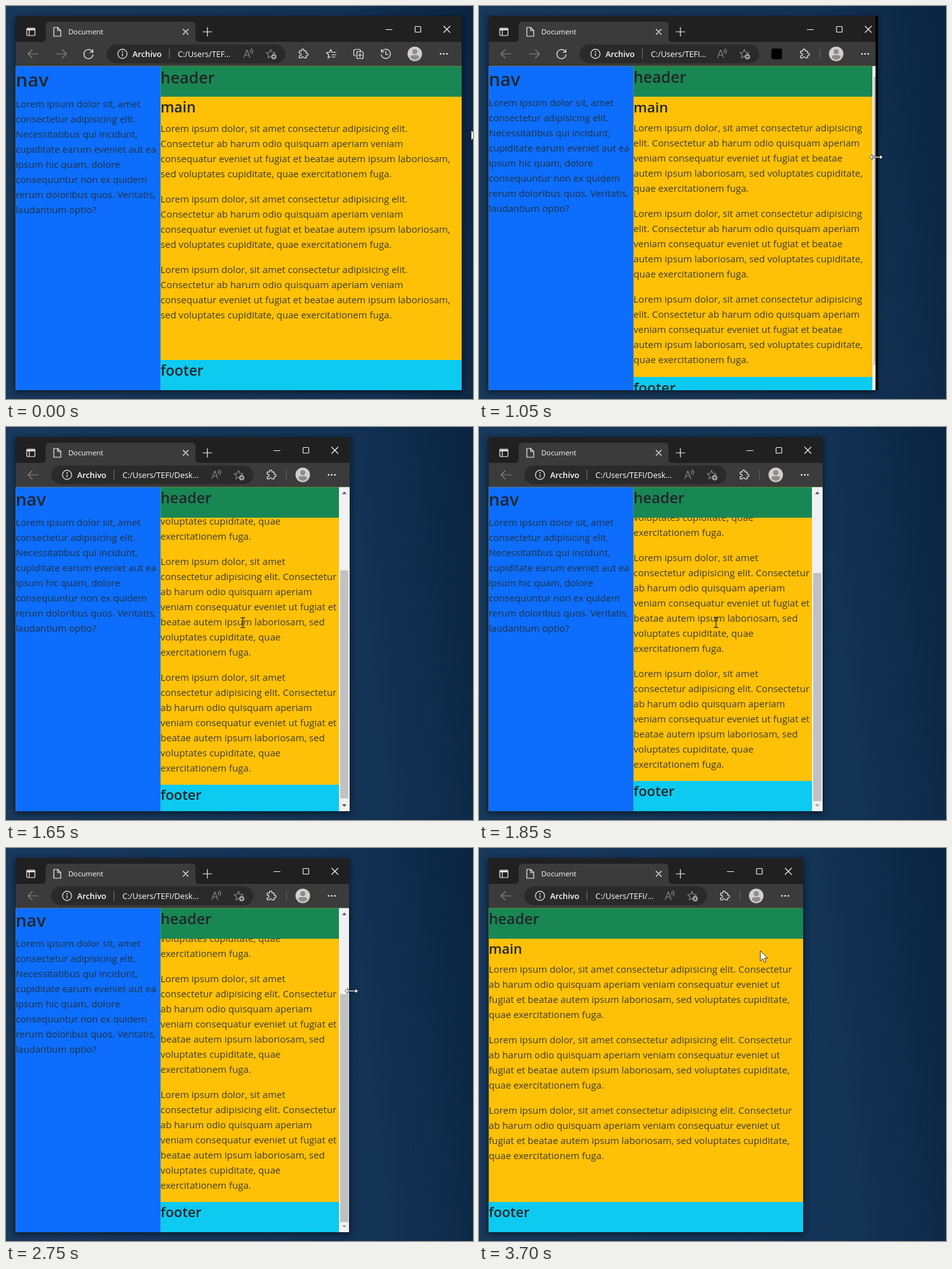
Recreate the animation shown at these times as an HTML page. Size 742 px wide and 624 px high, loop 3750 ms.

```html
<!DOCTYPE html>
<html lang="es">
<head>
<meta charset="utf-8">
<title>Responsive layout</title>
<style>
html, body { margin: 0; width: 742px; height: 624px; overflow: hidden; background: #0d2a49; }
svg { display: block; font-family: "Open Sans", "Noto Sans", sans-serif; }
text { white-space: pre; }
.p { font-size: 15.1px; fill: #212529; fill-opacity: .86; }
.h { font-weight: 600; fill: #212529; }
.ico { fill: none; stroke: #f2f2f2; stroke-width: 1.2; stroke-linecap: round; stroke-linejoin: round; }
.dim { stroke: #8a8a8a; }
.ui { fill: #fff; }
</style>
</head>
<body>
<svg width="742" height="624" viewBox="0 0 742 624">
  <defs>
    <linearGradient id="desk" x1="0" y1=".1" x2="1" y2="0">
      <stop offset="0" stop-color="#18395c"/>
      <stop offset=".72" stop-color="#133355"/>
      <stop offset="1" stop-color="#0a2441"/>
    </linearGradient>
    <filter id="blur" x="-10%" y="-10%" width="120%" height="120%"><feGaussianBlur stdDeviation="5"/></filter>
    <clipPath id="win"><rect id="winBox" x="15" y="16" height="594"/></clipPath>
    <clipPath id="body"><rect x="15" y="144" width="727" height="466"/></clipPath>
  </defs>
  <rect width="742" height="624" fill="url(#desk)"/>
  <rect id="shade" x="13" y="17" height="597" fill="#000" opacity=".45" filter="url(#blur)"/>
  <rect id="lag" y="16" width="4" height="594"/>
  <g clip-path="url(#win)"><g id="chrome"></g><g id="page"></g></g>
  <g id="cursor"></g>
</svg>
<script>
const LOOP = 3750, STEP = 50;
const TOP = 95.5, LEFT = 15.5, COL = 245.5, MAIN = 144, FOOT = 562;
const LOREM = 'Lorem ipsum dolor, sit amet consectetur adipisicing elit. Consectetur ab harum odio quisquam ' +
  'aperiam veniam consequatur eveniet ut fugiat et beatae autem ipsum laboriosam, sed voluptates ' +
  'cupiditate, quae exercitationem fuga.';
const NAV = 'Lorem ipsum dolor sit, amet|consectetur adipisicing elit.|Necessitatibus qui incidunt,|' +
  'cupiditate earum eveniet aut ea|ipsum hic quam, dolore|consequuntur non ex quidem|' +
  'rerum doloribus quos. Veritatis,|laudantium optio?';
const PATH = 'C:/Users/TEFI/Desktop';

// [time, value...] keys
const EDGE = [[680, 724], [800, 713], [1050, 630], [1100, 603], [1200, 555], [1250, 546],
  [2700, 546], [2750, 545], [3150, 515]];
const LAYOUT = [[850, 724], [1050, 642], [1100, 615], [1200, 560], [1250, 546], [2750, 546], [3200, 515]];
const SCROLL = [[1400, 0], [1500, 70], [1600, 145], [1650, 164], [1700, 171], [1950, 171], [2050, 115],
  [2100, 69], [2200, 0], [2250, 0], [2350, 100], [2450, 171]];
const MOUSE = [[0, 739, 197], [200, 734, 205], [400, 727, 214], [680, 727, 217], [800, 716, 219],
  [1050, 631, 240], [1100, 604, 243], [1200, 557, 246], [1250, 549, 247], [1400, 376, 311],
  [2100, 377, 310], [2450, 378, 310], [2550, 571, 240], [2650, 553, 228], [2750, 549, 227],
  [3150, 517, 224], [3250, 516, 222], [3500, 459, 177], [3600, 447, 163]];

const $ = id => document.getElementById(id);
const pen = document.createElement('canvas').getContext('2d');
pen.font = '15.1px "Open Sans", "Noto Sans", sans-serif';

function at(keys, t, i = 1) {
  const n = keys.findIndex(k => k[0] > t);
  if (n === 0) return keys[0][i];
  if (n < 0) return keys[keys.length - 1][i];
  const a = keys[n - 1], b = keys[n];
  return a[i] + (b[i] - a[i]) * (t - a[0]) / (b[0] - a[0]);
}

function wrap(str, width) {
  const lines = [];
  let line = '';
  for (const word of str.split(' ')) {
    const next = line ? line + ' ' + word : word;
    if (line && pen.measureText(next).width > width) { lines.push(line); line = word; }
    else line = next;
  }
  return lines.concat(line);
}

const rect = (x, y, w, h, fill, r = 0) =>
  `<rect x="${x}" y="${y}" width="${Math.max(0, w)}" height="${h}" rx="${r}" fill="${fill}"/>`;
const label = (x, y, s, cls, extra = '') => `<text x="${x}" y="${y}" class="${cls}" ${extra}>${s}</text>`;
const head = (x, y, size, s) => label(x, y + size, s, 'h', `font-size="${size * .912}"`);
const para = (x, y, lines) => lines.map((s, i) => label(x, y + 18.4 + i * 24, s, 'p')).join('');
const icon = (x, y, d, cls = '') => `<path class="ico ${cls}" transform="translate(${x} ${y})" d="${d}"/>`;
const ring = r => `M${-r} 0a${r} ${r} 0 1 1 ${2 * r} 0a${r} ${r} 0 1 1 ${-2 * r} 0`;

const STAR = 'M0-7l2 4.5 5 .6-3.7 3.4 1 5L0 4-4.3 6.5l1-5L-7-1.9l5-.6z';
const PUZZLE = 'M-6-4.5h3.5a2.2 2.2 0 1 1 4 0H5v3.5a2.2 2.2 0 1 1 0 4v3.5H1.5a2 2 0 1 0-4 0H-6V3a2.2 2.2 0 1 0 0-4z';
const ARROW = 'M8 0H-8M-1.5-6.5L-8 0l6.5 6.5';

function drawChrome(right) {
  const wide = right > 700, mid = right > 600;
  const pl = mid ? 160 : 72;
  const pr = right - (wide ? 280 : mid ? 197 : 153);
  const chars = Math.max(3, Math.min(18, Math.floor(12.85 + .2 * (pr - pl - 113 - 171))));
  let s = rect(LEFT, 16, 727, 41, '#202020') + rect(LEFT, 57, 727, 39, '#3b3b3b') +
    `<path fill="#3b3b3b" d="M57 57q6 0 6-6V31q0-6 6-6h226q6 0 6 6v20q0 6 6 6z"/>`;
  s += icon(39.5, 41, 'M-4.5-6h9q2 0 2 2v8q0 2-2 2h-9q-2 0-2-2v-8q0-2 2-2zM-2.5-3v9') +
    '<path fill="#f2f2f2" d="M33.5 36h12v2.5h-12z"/>' +
    icon(81.5, 41, 'M-5.5-7h6l5 5v9h-11zM.5-7v5h5') +
    label(99, 45.3, 'Document', 'ui', 'font-size="11.4" font-weight="500"') +
    icon(285.5, 41, 'M-4-4l8 8M4-4l-8 8') + icon(320, 41, 'M-7 0H7M0-7V7');
  s += icon(right - 115.5, 37.5, 'M-5 0H5') +
    icon(right - 69.5, 37, 'M-3.5-4.5h7q1 0 1 1v7q0 1-1 1h-7q-1 0-1-1v-7q0-1 1-1z') +
    icon(right - 23.5, 37, 'M-5-5L5 5M5-5L-5 5');

  s += icon(43, 76, ARROW, 'dim');
  if (mid) s += icon(88, 76, 'M-8 0H8M1.5-6.5L8 0l-6.5 6.5', 'dim') +
    icon(131, 76, 'M6.5-3A7.3 7.3 0 1 0 7.3 1M7-7v4.5H2.5');

  s += rect(pl, 61, pr - pl, 30, '#2a2a2a', 15) +
    icon(pl + 25, 76, ring(7.3) + 'M0-.5v4') + `<circle cx="${pl + 25}" cy="72.7" r="1" fill="#fff"/>` +
    label(pl + 41, 80.6, 'Archivo', 'ui', 'font-size="12.8" font-weight="600"') +
    rect(pl + 99, 68, 1, 16, '#777') +
    label(pl + 113, 80.6, PATH.slice(0, chars) + '...', 'ui', 'font-size="12.6" font-weight="500"') +
    icon(pr - 60, 76, 'M-6 6L-1.5-6h.5L3.5 6M-4.3 2h6M4-6q2 2 0 4M6-8q4 4 .5 8', 'dim') +
    icon(pr - 23.5, 76, STAR, 'dim') +
    `<circle cx="${pr - 18.5}" cy="80.5" r="4.3" fill="#a8a8a8"/>` +
    `<path d="M${pr - 21} 80.5h5m-2.5-2.5v5" stroke="#2a2a2a"/>`;

  if (wide) {
    s += icon(right - 252, 76, PUZZLE) +
      icon(right - 208, 76, 'M-2-2.5L0-7l2 4.5M-2-2.5l-5 .6 3.7 3.4-1 5L-1 4.5M2-2.5H8M2 1.5H8M2 5H7') +
      icon(right - 164, 76, 'M-5 3q-2.5 0-2.5-2.5v-5q0-2.5 2.5-2.5H1q2.5 0 2.5 2.5M-2.5-3.5h8q2 0 2 2v7q0 2-2 2h-6q-2 0-2-2zM2.5-1v6M-.5 2h6') +
      icon(right - 120.5, 76, 'M-6.5-3.5A7.3 7.3 0 1 1-7.3 1M-7-7v4h4M0-4V1H3.5');
  } else {
    if (mid) s += rect(right - 177.5, 67.5, 17, 17, '#000', 2.5);
    s += icon(right - 125, 76, PUZZLE) + rect(right - 101, 68, 1, 16, '#626262');
  }
  const ax = right - 74.5;
  s += `<circle cx="${ax}" cy="76" r="11.5" fill="#d2d0ce"/><circle cx="${ax}" cy="72.5" r="4" fill="#8e8b88"/>` +
    `<path fill="#8e8b88" d="M${ax - 7} 82q0-4 4-4h6q4 0 4 4-7 7-14 0z"/>`;
  for (const d of [-5, 0, 5]) s += `<circle cx="${right - 28.5 + d}" cy="76" r="1.3" fill="#fff"/>`;
  return s;
}

function drawBar(right, over, scroll) {
  const x = right - 17, len = 482 * 514 / (514 + over);
  const y = 112 + (482 - len) * scroll / over;
  const tone = on => on ? '#505050' : '#a3a3a3';
  return rect(x, TOP, 17, 515, '#f1f1f1') + rect(x + 2, y, 13, len, '#c1c1c1') +
    `<path fill="${tone(true)}" d="M${x + 5} 106.5l3.5-4 3.5 4z"/>` +
    `<path fill="${tone(scroll < over - 1)}" d="M${x + 5} 599l3.5 4 3.5-4z"/>`;
}

function drawPage(right, t) {
  const vw = (right - 15) / 100;
  const h1 = 22 + 1.5 * vw, h2 = 21.2 + .9 * vw, h3 = 20.8 + .6 * vw;
  const single = t >= 3250, x = single ? LEFT : COL;
  const first = MAIN + 1.2 * h3 + 7.5;
  const flow = w => {
    const lines = wrap(LOREM, w - 1);
    return { lines, end: Math.round(first + 3 * (lines.length * 24 + 16)) };
  };
  let f = flow(right - x);
  const bar = f.end > FOOT;
  if (bar) f = flow(right - x - 17);
  const over = Math.max(0, f.end - FOOT);
  const scroll = Math.min(over, at(SCROLL, t));
  const foot = Math.max(FOOT, f.end) - scroll;

  let s = rect(LEFT, TOP, 727, 515, '#ffc107') + '<g clip-path="url(#body)">' + head(x, MAIN - scroll, h3, 'main');
  for (let i = 0; i < 3; i++) s += para(x, first - scroll + i * (f.lines.length * 24 + 16), f.lines);
  s += rect(x, foot, 742 - x, 48, '#0dcaf0') + head(x, foot, h3, 'footer') + '</g>';
  s += rect(x, TOP, 742 - x, MAIN - TOP, '#198754') + head(x, TOP, h2, 'header');
  if (!single) s += rect(LEFT, TOP, COL - LEFT, 515, '#0d6efd') + head(LEFT, TOP, h1, 'nav') +
    para(LEFT, TOP + 1.2 * h1 + 7.6, NAV.split('|'));
  if (bar) s += drawBar(right, over, scroll);
  return s;
}

function drawCursor(t) {
  const go = `<g transform="translate(${at(MOUSE, t)} ${at(MOUSE, t, 2)})">`;
  const resize = t >= 350 && t < 1300 || t >= 2600 && t < 3300;
  const beam = t >= 1350 && t < 2520;
  if (resize) return go + '<path d="M-10.5 0l4.5-4v3H6v-3l4.5 4L6 4V1H-6v3z" fill="#fff" stroke="#000" stroke-width=".7"/></g>';
  if (beam) return go + '<path d="M-3.5-8h2.5l1 1 1-1h2.5M0-7V7M-3.5 8h2.5l1-1 1 1h2.5" fill="none" stroke="#222" stroke-width="1.2"/></g>';
  return go + '<path d="M0 0v16.5l3.8-3.6 2.4 5.7 2.7-1.1-2.4-5.6h5.2z" fill="#fff" stroke="#000" stroke-width=".8"/></g>';
}

function draw(t) {
  const edge = at(EDGE, t), right = Math.round(at(LAYOUT, t));
  $('winBox').setAttribute('width', edge - 15);
  $('shade').setAttribute('width', edge - 11);
  $('lag').setAttribute('x', edge);
  $('lag').setAttribute('opacity', t >= 900 && t < 1250 ? 1 : 0);
  $('chrome').innerHTML = drawChrome(right);
  $('page').innerHTML = drawPage(right, t);
  $('cursor').innerHTML = drawCursor(t);
}

let start = null, last = -1;
function tick(now) {
  if (start === null) start = now;
  const t = Math.floor((now - start) % LOOP / STEP) * STEP;
  if (t !== last) draw(last = t);
  requestAnimationFrame(tick);
}
draw(0);
requestAnimationFrame(tick);
</script>
</body>
</html>
```
